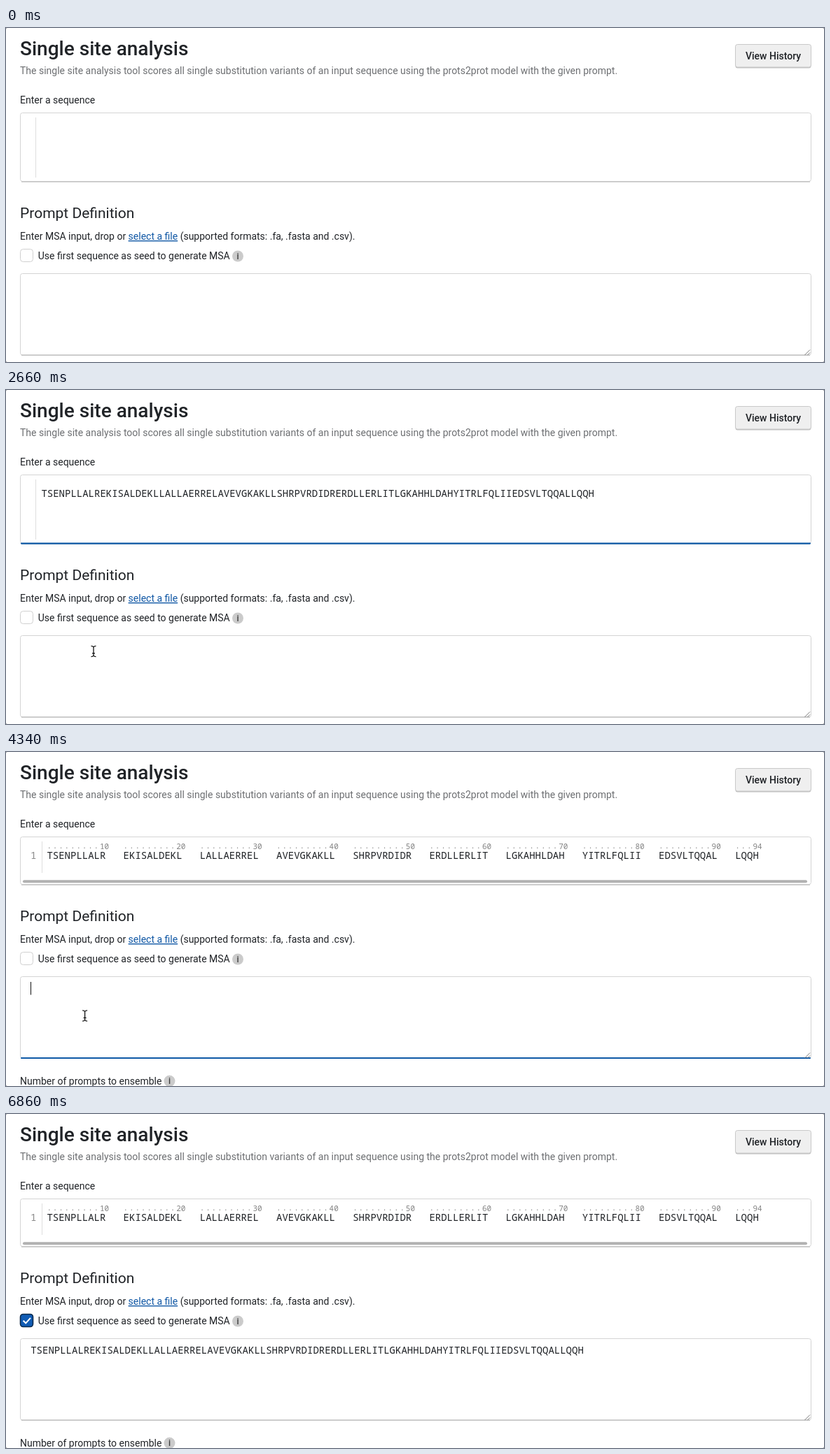
Animation, 1168 px wide and 478 px high, one loop 7420 ms. Source, as an HTML page:

```html
<!DOCTYPE html>
<html lang="en">
<head>
<meta charset="utf-8">
<title>Single site analysis</title>
<style>
  html, body { margin: 0; width: 100%; height: 100%; overflow: hidden; background: #8a8a8a; }
  svg { display: block; width: 1168px; height: 478px; }
  text { font: 14px Roboto, sans-serif; fill: #202327; }
  .mono { font-family: "Noto Sans Mono", monospace; }
  .title { font-size: 28px; font-weight: 500; }
  .heading { font-size: 21px; }
  .note { fill: #6d6f72; }
  .button { font-weight: 500; text-anchor: middle; }
  .link { fill: #1158a5; text-decoration: underline; text-decoration-thickness: 1px; }
  .info { font-size: 12px; font-weight: 500; text-anchor: middle; fill: #3c3c3c; }
  .ruler { font-size: 11px; fill: #838383; }
  .dots { letter-spacing: 1.8px; }
  .row { fill: #8a8a8a; }
  .field { fill: #fff; stroke: #d4d4d4; }
  .edge { stroke: #c3c3c3; stroke-width: 1.5; }
  .gutter { stroke: #dedede; }
  .focus { stroke: #0d59a6; stroke-linecap: round; }
  .caret { stroke: #111; }
  .bar { fill: #b1b1b1; }
  .grip { fill: none; stroke: #777; }
  .halo { fill: none; stroke: #fff; stroke-width: 3; }
  .beam { fill: none; stroke: #111; stroke-width: 1.3; }
</style>
</head>
<body>
<svg viewBox="0 0 1168 478" xmlns="http://www.w3.org/2000/svg">
  <defs>
    <path id="beamShape" d="M-3.5-7.7Q-.8-7.7 0-6Q.8-7.7 3.5-7.7M0-6V6M-3.5 7.7Q-.8 7.7 0 6Q.8 7.7 3.5 7.7M-2 2.8H2"/>
    <g id="info">
      <circle r="8" fill="#cbcbcb"/>
      <text class="info" y="4.3">i</text>
    </g>
  </defs>

  <rect width="1168" height="478" rx="2" fill="#fff"/>
  <text class="title" x="20" y="39">Single site analysis</text>
  <text class="note" x="20" y="66">The single site analysis tool scores all single substitution variants of an input sequence using the prots2prot model with the given prompt.</text>
  <rect x="1041.5" y="24.5" width="108" height="33" rx="3" fill="#c0c0c0"/>
  <rect x="1041.5" y="23.5" width="108" height="32.5" rx="3" fill="#efefef" stroke="#c9c9c9"/>
  <text class="button" x="1095.5" y="45">View History</text>
  <text x="20" y="108">Enter a sequence</text>

  <g id="raw">
    <rect class="field" x="20.5" y="121.5" width="1129" height="98" rx="3"/>
    <path class="edge" d="M22 219.9H1148"/>
    <path class="gutter" d="M42.5 128V214"/>
    <text class="mono" id="seqText" x="50.4" y="153"></text>
  </g>

  <g id="parsed">
    <rect class="field" x="20.5" y="121.5" width="1129" height="68" rx="3"/>
    <path class="edge" d="M22 189.9H1148"/>
    <path class="gutter" d="M51.5 128V173"/>
    <text class="mono row" x="35" y="153">1</text>
    <g id="groups"></g>
    <rect class="bar" id="hBar" x="24" y="183.2" width="1120" height="4" rx="2"/>
    <rect class="bar" id="vBar" x="1142" y="125" width="4" height="50" rx="2"/>
  </g>
  <path class="focus" id="seqFocus"/>

  <g id="lower">
    <text class="heading" x="20" y="272">Prompt Definition</text>
    <text x="20" y="303">Enter MSA input, drop or <tspan class="link">select a file</tspan> (supported formats: .fa, .fasta and .csv).</text>
    <rect id="check" x="20.5" y="316.5" width="18" height="18" rx="4"/>
    <path id="tick" d="M24.6 325.8L28.2 329.3L35 321.8" fill="none" stroke="#fff" stroke-width="2"/>
    <text x="45.7" y="331">Use first sequence as seed to generate MSA</text>
    <use href="#info" x="331" y="326.5"/>
    <rect class="field" x="20.5" y="351.5" width="1129" height="116.5" rx="3"/>
    <path class="edge" d="M22 468.3H1148"/>
    <path class="focus" id="msaFocus"/>
    <path class="grip" d="M1140.5 468L1148 460.5M1144.5 468L1148 464.5"/>
    <text class="mono" id="msaText" x="35.2" y="373"></text>
    <text x="20" y="505.5">Number of prompts to ensemble</text>
    <use href="#info" x="233.5" y="500.8"/>
  </g>

  <path class="caret" id="caret"/>

  <g id="pointer">
    <circle id="ring" r="16.7" fill="none" stroke="#111" stroke-width="1.5"/>
    <g id="beam">
      <use class="halo" href="#beamShape"/>
      <use class="beam" href="#beamShape"/>
    </g>
    <path id="arrow" d="M0 0V14.3L3.3 11.3L5.6 16.3L8 15.2L5.8 10.4H10.2Z" fill="#000" stroke="#fff"/>
  </g>
</svg>

<script>
const LOOP = 7420, STEP = 70;
const SEQ = "TSENPLLALREKISALDEKLLALLAERRELAVEVGKAKLLSHRPVRDIDRERDLLERLITLGKAHHLDAHYITRLFQLIIEDSVLTQQALLQQH";
const CELL = 8.4;
const $ = id => document.getElementById(id);
const set = (id, attrs) => {
  for (const key in attrs) $(id).setAttribute(key, attrs[key]);
};
const show = (id, on) => set(id, { visibility: on ? "visible" : "hidden" });
const within = (t, a, b) => t >= a && t < b;
const ramp = (t, a, b) => Math.min(1, Math.max(0, (t - a) / (b - a)));
const smooth = k => k * k * (3 - 2 * k);
const easeOut = k => 1 - (1 - k) ** 2;
const easeIn = k => k * k;

// Groups of ten residues, each under a dotted ruler
$("groups").innerHTML = SEQ.match(/.{1,10}/g).map((part, i) => {
  const x = 58.4 + i * 13 * CELL;
  const dots = part.length === 10 ? 9 : part.length - 1;
  const end = i * 10 + part.length;
  return `<text class="mono ruler dots" x="${x}" y="138">${".".repeat(dots)}</text>
    <text class="mono ruler" x="${x + dots * CELL}" y="138.5">${end}</text>
    <text class="mono" x="${x}" y="153">${part}</text>`;
}).join("");

// Pointer moves: start, end, from, to, easing
const moves = [
  [630, 910, [178, 215], [87, 150], easeOut],
  [2380, 2660, [87, 150], [125, 374], smooth],
  [2660, 2940, [125, 374], [112.6, 377.5], smooth],
  [4900, 5320, [112.6, 377.5], [39, 303.5], smooth],
  [5320, 5460, [39, 303.5], [27, 279], easeOut],
  [5460, 5600, [27, 279], [24.5, 294.5], smooth],
  [6370, 6790, [24.5, 294.5], [1134, 445], easeIn]
];
// Clicks: ring appears, starts to fade, is gone
const clicks = [[910, 1050, 1260], [3010, 3360, 3570], [5810, 6020, 6300]];
// Carets: on, off, x, top
const carets = [
  [980, 1470, 50.5, 138], [1960, 2450, 840.5, 138], [2940, 3010, 840.5, 138],
  [3290, 3850, 35.5, 329], [4340, 4480, 35.5, 329],
  [4480, 4970, 825, 329], [5460, 5810, 825, 329]
];

function pointerAt(t) {
  const [a, b, from, to, ease] = moves.filter(m => t >= m[0]).pop() || moves[0];
  const k = ease(ramp(t, a, b));
  return from.map((v, i) => v + (to[i] - v) * k);
}

function focusLine(id, y, right, k) {
  set(id, { d: `M22 ${y}H${right}`, "stroke-width": 1 + 1.2 * k, opacity: k });
}

function render(t) {
  const split = t >= 3290;
  const checked = t >= 5950;
  const hover = within(t, 5250, 6440);

  show("raw", !split);
  show("parsed", split);
  $("seqText").textContent = t >= 1960 ? SEQ : "";
  $("msaText").textContent = t >= 4480 ? SEQ : "";
  set("lower", { transform: `translate(0 ${split ? -30 : 0})` });

  const fade = ramp(t, 3430, 3710);
  set("vBar", { opacity: 1 - fade });
  set("hBar", { width: fade < 1 ? 1100 : 1120 });

  focusLine("seqFocus", split ? 189.6 : 219.6, split ? 1139 : 1148,
    ramp(t, 840, 1120) * (1 - ramp(t, 3290, 3500)));
  focusLine("msaFocus", 468, 1148,
    (split ? ramp(t, 3150, 3430) : 0.3 * ramp(t, 2940, 3010)) * (1 - ramp(t, 5810, 6020)));

  set("check", {
    fill: checked ? "#115cb4" : "#fff",
    stroke: checked ? "#0b2a4d" : hover ? "#8799ad" : "#d0d0d0",
    "stroke-width": checked ? 1.6 : 1
  });
  show("tick", checked);

  const caret = carets.find(c => within(t, c[0], c[1]));
  show("caret", caret);
  if (caret) set("caret", { d: `M${caret[2]} ${caret[3]}v18.5` });

  const [x, y] = pointerAt(t);
  const seen = within(t, 630, 6860);
  const top = split ? 321 : 351;
  const overField = within(y, 121, split ? 190 : 220) || within(y, top, top + 118);
  const click = clicks.find(c => within(t, c[0], c[2]));
  set("pointer", { transform: `translate(${x} ${y})` });
  show("beam", seen && overField);
  show("arrow", seen && !overField);
  show("ring", click);
  if (click) set("ring", { opacity: 1 - ramp(t, click[1], click[2]) });
}

const start = performance.now();
function tick() {
  const t = (performance.now() - start) % LOOP;
  render(Math.floor(t / STEP) * STEP);
  requestAnimationFrame(tick);
}
tick();
</script>
</body>
</html>
```
